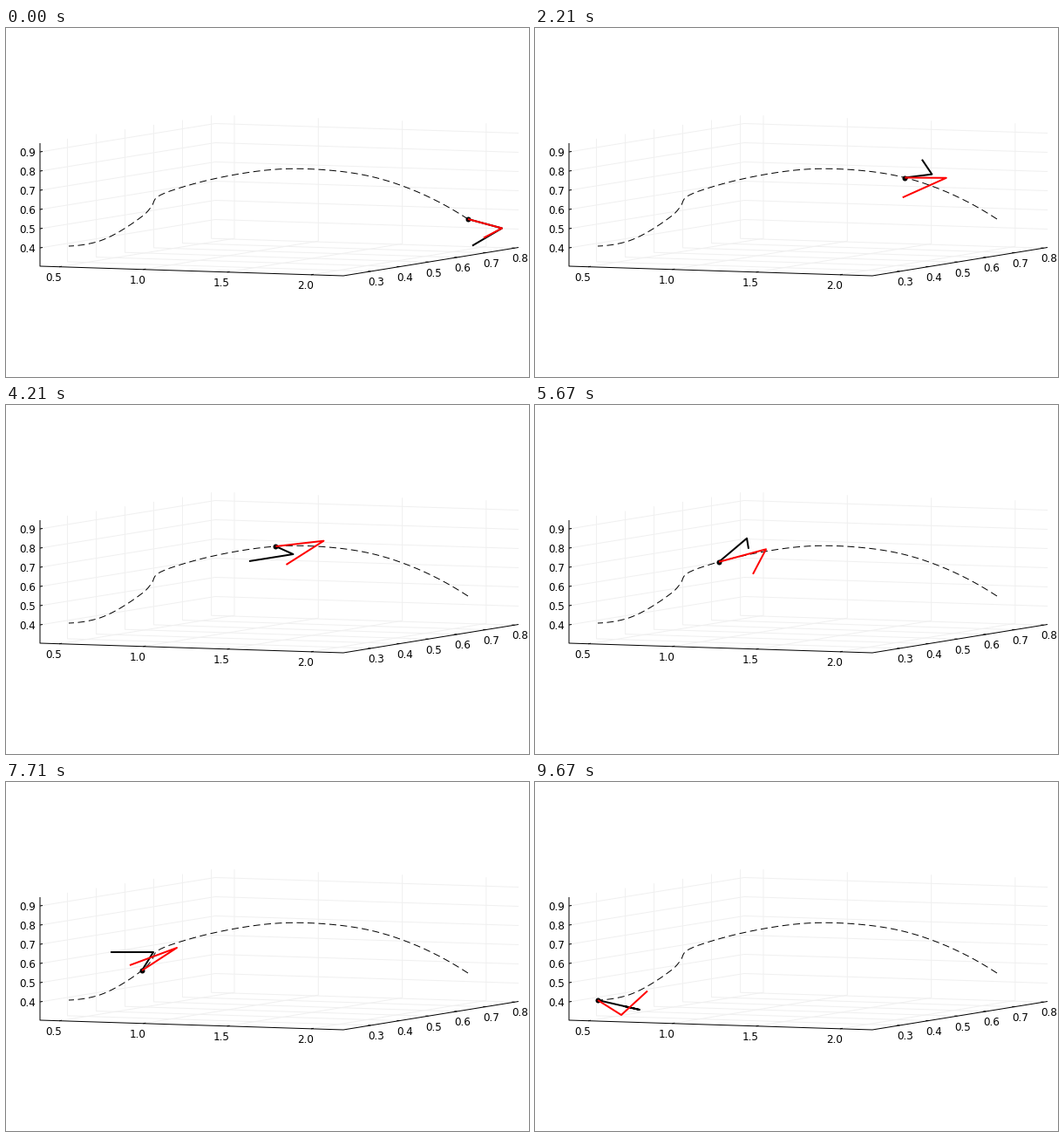
These frames come from a looping animation (600 by 400 pixels, 9710 ms). A matplotlib script:

```python
import numpy as np
import matplotlib.pyplot as plt
from matplotlib.animation import FuncAnimation

W, H = 600, 400
FRAMES, LOOP_MS, FPS = 234, 9710, 24
END = 232 / FPS  # motion stops here and the last pose is held
PX = 0.72        # points per pixel at 100 dpi

# Key points: time (s), then x, y of the carrier
FLIGHT = [(0, 530, 219), (1.333, 466, 185.3), (3.083, 379, 163.8),
          (4.208, 309.5, 162), (5.667, 211, 179.8), (6.4, 174.5, 193),
          (7, 167, 204.5), (7.708, 156, 216), (9, 103.5, 245.3), (END, 72, 250)]

# Key poses: time (s), then elbow and tip offsets from the carrier
BLACK = [(0, 39, 10.5, 5, 30.5), (1.333, 41.5, -5, 31, 7),
         (2.1, 33, -5, 21, -20), (3.083, 12.5, 12, 7.5, -4.5),
         (4.208, 20, 9, -30.5, 17), (5.667, 32, -27, 34, -15),
         (6.8, 7, -35, -13, -67), (7.708, 13, -21, -36, -21),
         (8.6, 36, -4, -8, 10), (END, 48, 11, 30, 6.9)]
RED = [(0, 39, 10.5, 18, 21.5), (1.333, 45, 4.7, 2, 24),
       (3.083, 50, -3.6, -1, 21), (4.208, 55, -6.3, 12, 21),
       (5.667, 54, -14.5, 39, 14), (7.708, 40, -26, -14, -6),
       (8.6, 42, -15, 30, -26), (END, 27, 17, 57, -10.5)]


def spline(keys, t):
    """Cubic Hermite curve through rows of (time, values...)."""
    keys = np.array(keys)
    kt, kv = keys[:, 0], keys[:, 1:]
    slope = np.gradient(kv, kt, axis=0, edge_order=2)
    i = np.clip(np.searchsorted(kt, t, side="right") - 1, 0, len(kt) - 2)
    h = (kt[i + 1] - kt[i])[:, None]
    u = (t - kt[i])[:, None] / h
    return ((1 + 2 * u) * (1 - u) ** 2 * kv[i] + u * (1 - u) ** 2 * h * slope[i]
            + u * u * (3 - 2 * u) * kv[i + 1] + u * u * (u - 1) * h * slope[i + 1])


fig = plt.figure(figsize=(W / 100, H / 100), dpi=100, facecolor="white")
ax = fig.add_axes([0, 0, 1, 1])
ax.set_xlim(0, W)
ax.set_ylim(H, 0)
ax.axis("off")


def line(points, color="black", width=1, z=2, **kw):
    x, y = zip(*points)
    return ax.plot(x, y, color=color, lw=width * PX, zorder=z,
                   solid_capstyle="butt", solid_joinstyle="round", **kw)[0]


def grid(*points):
    line(points, "#f0f0f0", z=1)


def label(x, y, value):
    ax.text(x - 0.4, y + 4.4, f"{value:.1f}", size=12 * PX,
            family="DejaVu Sans", ha="center", va="baseline")


# Box edges on screen
LEFT, FRONT, RIGHT = map(np.array, ((39, 273), (387, 284), (588, 251.5)))
DEPTH, SPAN, UP = RIGHT - FRONT, FRONT - LEFT, np.array((0, -141))

for k in range(4):
    p = LEFT + SPAN * (22 + 96.3 * k) / 348
    grid(p, p + DEPTH, p + DEPTH + UP)
    line([p, p + DEPTH * 0.015])
    label(55 + 96.3 * k, 286 + 3 * k, 0.5 + 0.5 * k)

for k in range(6):
    p = FRONT + DEPTH * (31.5 + 33 * k) / 201
    grid(p, p - SPAN, p - SPAN + UP)
    line([p, p - SPAN * 0.009])
    label(425 + 33 * k, 291 - 5.4 * k, 0.3 + 0.1 * k)

    p = np.array((39, 252 - 22 * k))
    grid(p, p + DEPTH, p + DEPTH + SPAN)
    line([p, p + DEPTH * 0.015])
    label(25, p[1] + 0.5, 0.4 + 0.1 * k)

line([LEFT + UP, LEFT, FRONT, RIGHT])
line(spline(FLIGHT, np.linspace(0, END, 500)), z=3,
     dashes=(8, 4.5), dash_capstyle="butt")

times = np.minimum(np.arange(FRAMES) / FPS, END)
carrier = spline(FLIGHT, times)
poses = [spline(keys, times) for keys in (BLACK, RED)]

arms = [line([(0, 0)] * 3, "black", 2, 4), line([(0, 0)] * 3, "red", 2, 6)]
dot, = ax.plot([0], [0], "o", color="black", ms=6 * PX, mew=0, zorder=5)


def update(n):
    base = carrier[n]
    for arm, pose in zip(arms, poses):
        joints = np.array([base, base + pose[n, :2], base + pose[n, 2:]])
        arm.set_data(joints[:, 0], joints[:, 1])
    dot.set_data([base[0]], [base[1]])
    return [*arms, dot]


anim = FuncAnimation(fig, update, frames=FRAMES, interval=LOOP_MS / FRAMES,
                     repeat=True, repeat_delay=0)
plt.show()
```
